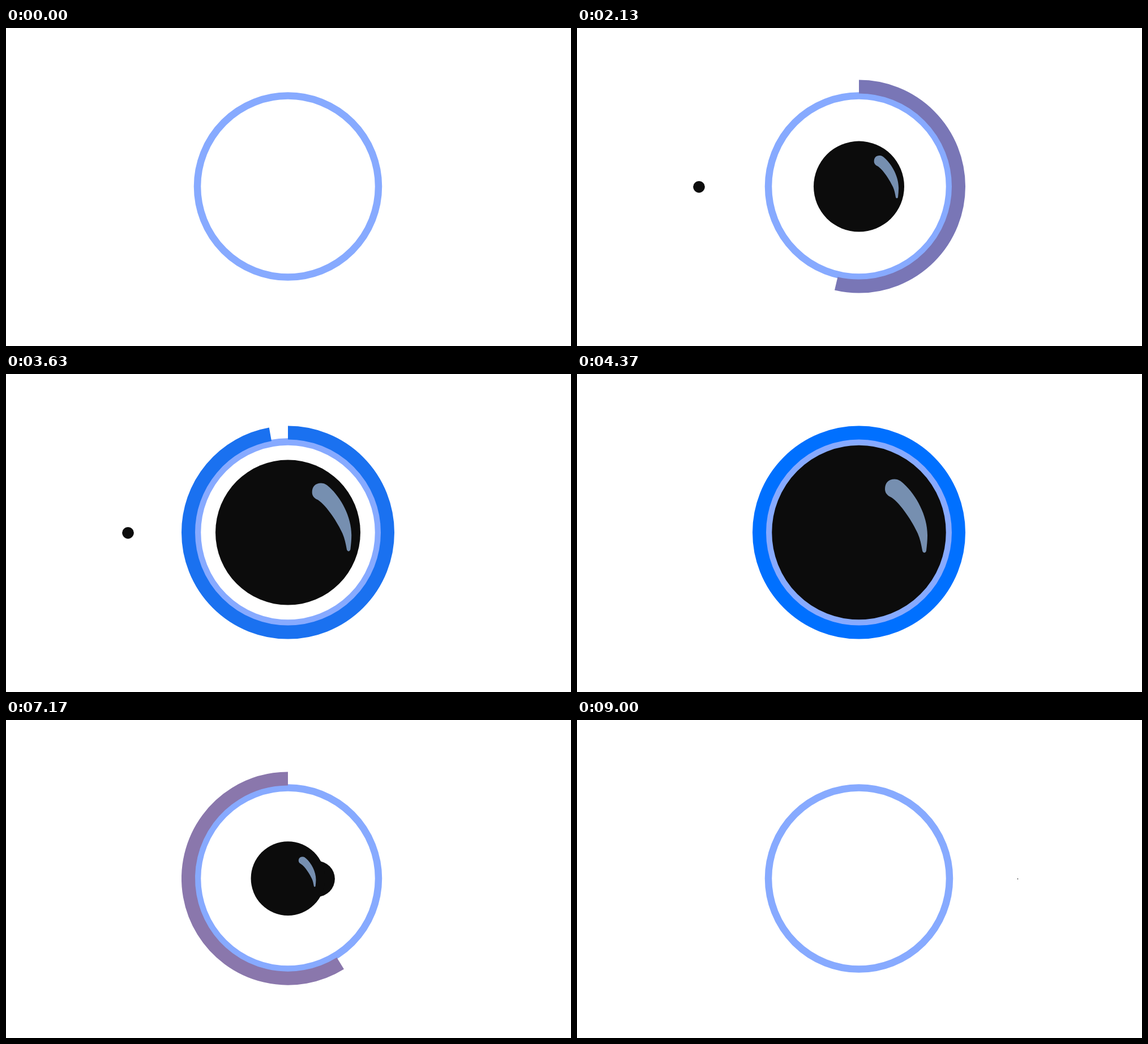
An HTML page with a canvas that plays this animation: 998 px wide and 561 px high, repeating every 9.03 s.

```html
<!DOCTYPE html>
<html lang="en">
<head>
<meta charset="utf-8">
<title>Eye loader</title>
<style>
  html, body { margin: 0; width: 100%; height: 100%; overflow: hidden; background: #fff; }
  canvas { display: block; }
</style>
</head>
<body>
<canvas id="stage" width="998" height="561"></canvas>
<script>
const ctx = document.getElementById('stage').getContext('2d');
const LOOP = 9030, LAST = 9000, CYCLE = 500, DOTS = 8;
const CX = 498, CY = 279.6, DOT_Y = 280.3;
const FILL = { start: 33, span: 4000 };
const DRAIN = { start: 5022, span: 3970 };
const DOT_OUT = 5024;
const PULSE = { start: 4033, span: 320, gain: 0.3 };
const DOT_R = 31.5, DOT_DIST = 282.5, STEP = 16;
const SHINE_SIZE = 138, SHINE_RATIO = 138 / 160;
const INK = '#0c0c0c';
const WARM = [255, 125, 102], COOL = [0, 112, 255];
const shine = new Path2D(
  'M46-76.5C46-87 52-94 63-94C69-94 74-91 79-86C101-66 121-30 121 5' +
  'C121 14 120 23 119 32C118 37 113 37 112 32C110 21 108 11 104 2' +
  'C95-18 74-51 57-62C50-65 46-70 46-76.5Z');

const clamp = x => Math.min(1, Math.max(0, x));
const mix = (a, b, x) => a + (b - a) * x;
const smooth = x => { x = clamp(x); return x * x * (3 - 2 * x); };
const ramp = (t, from, to) => smooth((t - from) / (to - from));

// Bezier (1/3, 0, 5/6, 5/6): soft start, straight finish
function easeStart(x) {
  let lo = 0, hi = 1;
  for (let i = 0; i < 24; i++) {
    const s = (lo + hi) / 2, r = 1 - s;
    if (s * r * r + 2.5 * s * s * r + s * s * s < x) lo = s; else hi = s;
  }
  return 2.5 * lo * lo * (1 - lo) + lo * lo * lo;
}

function cycleAt(u) {
  const k = Math.floor(u / CYCLE);
  return { k, age: u - k * CYCLE, active: k >= 0 && k < DOTS };
}

function pose(t) {
  const p = { pupil: 0, shine: 1, dotR: 0, dotX: 0, from: 0, to: 0, warm: 0, scale: 1 };
  if (t < DRAIN.start) {
    const u = t - FILL.start, c = cycleAt(u), x = clamp(u / FILL.span);
    p.to = smooth(x);
    p.warm = 1 - x;
    if (c.active) {
      p.dotR = DOT_R * ramp(c.age, 52, 172);
      p.dotX = -DOT_DIST * (1 - ramp(c.age, 160, 400));
      p.pupil = mix(c.k ? STEP * (c.k + 1) : 0, STEP * (c.k + 2), ramp(c.age, 390, 500));
    } else if (c.k >= DOTS) {
      const v = t - PULSE.start, grow = smooth(v / 170);
      p.pupil = mix(144, 160, grow);
      p.shine = mix(1, SHINE_RATIO, grow);
      p.scale = 1 + PULSE.gain * smooth(1 - Math.abs(2 * v / PULSE.span - 1));
    }
  } else {
    const c = cycleAt(t - DOT_OUT), x = clamp((t - DRAIN.start) / DRAIN.span);
    p.from = easeStart(x);
    p.to = x < 1 ? 1 : p.from;
    p.warm = x;
    p.shine = SHINE_RATIO;
    p.pupil = c.k < 0 ? 160 : 0;
    if (c.active) {
      const a = c.k ? 144 - STEP * c.k : 160;
      const b = c.k < DOTS - 1 ? 128 - STEP * c.k : 0;
      p.pupil = mix(a, b, ramp(c.age, 0, 180));
      p.dotR = DOT_R * (1 - ramp(c.age, 252, 500));
      p.dotX = DOT_DIST * ramp(c.age, 15, 500);
    }
  }
  return p;
}

function disc(x, y, r) {
  if (r <= 0) return;
  ctx.fillStyle = INK;
  ctx.beginPath();
  ctx.arc(x, y, r, 0, Math.PI * 2);
  ctx.fill();
}

function ring(r, width, color, from, to) {
  if (to <= from) return;
  const top = -Math.PI / 2, turn = Math.PI * 2;
  ctx.lineWidth = width;
  ctx.strokeStyle = color;
  ctx.beginPath();
  ctx.arc(0, 0, r, top + from * turn, top + to * turn);
  ctx.stroke();
}

function draw(t) {
  const p = pose(t);
  ctx.fillStyle = '#fff';
  ctx.fillRect(0, 0, 998, 561);
  ctx.save();
  ctx.translate(CX, CY);
  ctx.scale(p.scale, p.scale);
  disc(p.dotX, DOT_Y - CY, p.dotR);
  disc(0, 0, p.pupil);
  if (p.pupil > 0) {
    const s = p.pupil * p.shine / SHINE_SIZE;
    ctx.save();
    ctx.scale(s, s);
    ctx.fillStyle = '#768fb0';
    ctx.fill(shine);
    ctx.restore();
  }
  ring(160, 12.5, '#87aaff', 0, 1);
  const rgb = COOL.map((c, i) => Math.round(mix(c, WARM[i], p.warm)));
  ring(176, 24, `rgb(${rgb})`, p.from, p.to);
  ctx.restore();
}

function frame() {
  draw(Math.min(performance.now() % LOOP, LAST));
  requestAnimationFrame(frame);
}
frame();
</script>
</body>
</html>
```
